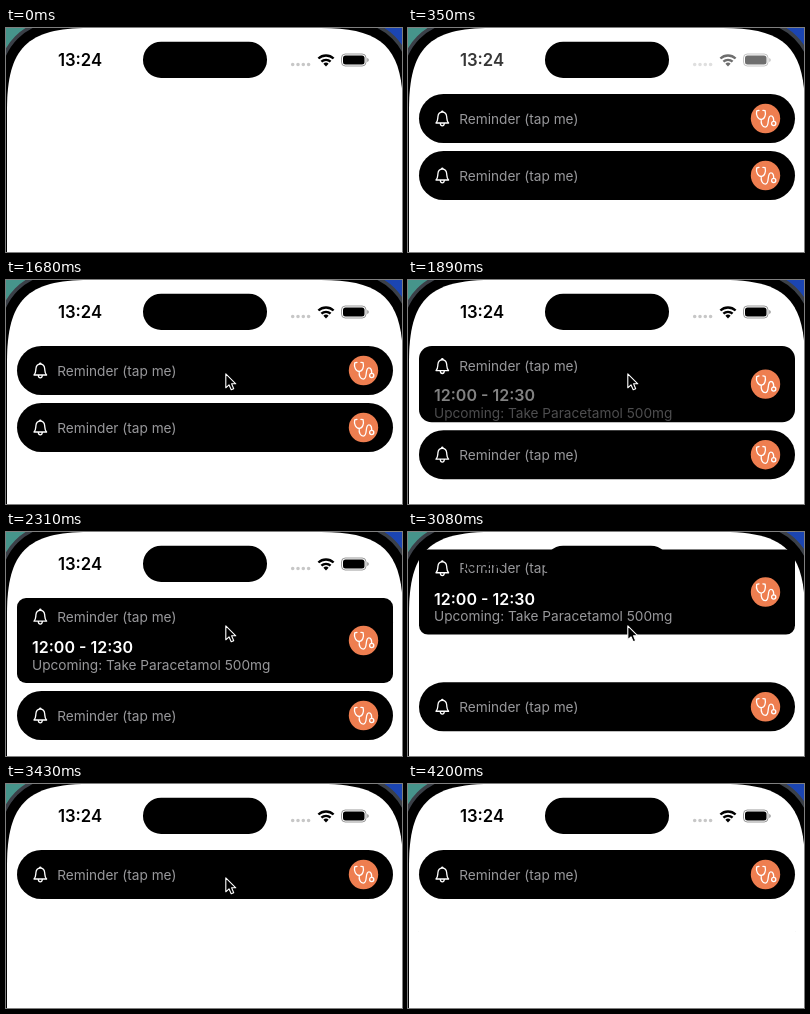
Animation, 396 px wide and 224 px high, one loop 4.34 s. Source, as an HTML page:

```html
<!DOCTYPE html>
<html lang="en">
<head>
<meta charset="utf-8">
<title>Reminder cards</title>
<style>
  html, body { margin: 0; width: 100%; height: 100%; overflow: hidden; background: #000; }
  svg { display: block; width: 100%; height: 100%; font-family: Inter, "Open Sans", sans-serif; }
  .line { fill: none; stroke: #fff; stroke-width: 1.3; stroke-linecap: round; stroke-linejoin: round; }
  .muted { fill: #98989b; font-size: 13.65px; }
  .title { fill: #fff; font-size: 16px; font-weight: 600; }
  .clock { font-size: 16.7px; font-weight: 600; }
</style>
</head>
<body>
<svg viewBox="0 0 396 224">
  <defs>
    <linearGradient id="desktop">
      <stop offset=".1" stop-color="#46948b"/>
      <stop offset=".9" stop-color="#1b45b2"/>
    </linearGradient>
    <path id="screen" d="M1 300V82C1 20 21 0 83 0H315C377 0 397 20 397 82V300Z"/>
    <g id="bell" class="line">
      <path d="M-6.3 4.3C-4.3 2.3-4.6.4-4.4-2C-4.1-5-2.3-6.5 0-6.5S4.1-5 4.4-2C4.6.4 4.3 2.3 6.3 4.3ZM-1-6.7Q0-8.6 1-6.7M-2 4.8Q-1.8 7.2 0 7.2T2 4.8"/>
    </g>
    <g id="badge">
      <circle r="14.7" fill="#ee7e50"/>
      <path class="line" d="M-6.5-8.2L-8.8-7.6C-9.8-3.5-7.6 1-4.2 1S.6-3.8-.4-7.8L-2.6-8.2M-4.2 1C-4.8 5-3.2 8.6-.2 8.6C4.6 8.6 1-2.6 5.4-2.6C8-2.6 8.2.4 8.2 2.8"/>
      <circle class="line" cx="8.2" cy="5" r="2.1"/>
    </g>
  </defs>

  <rect width="396" height="224" fill="url(#desktop)"/>
  <use href="#screen" fill="none" stroke="#3b4048" stroke-width="27"/>
  <use href="#screen" fill="none" stroke="#000" stroke-width="20"/>
  <use href="#screen" fill="#fff"/>
  <g id="cards"></g>

  <rect x="137" y="13.7" width="124" height="36.3" rx="18.1"/>
  <text id="clock" class="clock" x="74" y="38" text-anchor="middle">13:24</text>
  <g id="icons" fill="currentColor">
    <path d="M286.7 36.5h17" fill="none" stroke="currentColor" stroke-width="3.6" stroke-linecap="round" stroke-dasharray="0 5.3" opacity=".22"/>
    <g transform="translate(320 38.5)">
      <path d="M0 0L-2.6-2.8A3.8 3.8 0 0 1 2.6-2.8Z"/>
      <path d="M-4.6-4.8A6.7 6.7 0 0 1 4.6-4.8M-7.6-8A11 11 0 0 1 7.6-8" fill="none" stroke="currentColor" stroke-width="2.4"/>
    </g>
    <rect x="335.5" y="26" width="24.5" height="12" rx="3.8" fill="none" stroke="currentColor" opacity=".4"/>
    <rect x="337" y="27.5" width="21.5" height="9" rx="2.5"/>
    <path d="M361.2 30Q362.8 30.6 362.8 32T361.2 34Z" opacity=".4"/>
  </g>
  <path id="cursor" d="M0 0V14L3.2 11L5.4 16L7.9 14.9L5.8 10H10Z" stroke="#fff" stroke-width="1.1" stroke-linejoin="round"/>
</svg>
<script>
const LOOP = 4340, STEP = 70;
const $ = id => document.getElementById(id);
const mix = (a, b, k) => a + (b - a) * k;
const progress = (t, start, length) => Math.min(1, Math.max(0, (t - start) / length));
const easeOut = (x, power = 3) => 1 - (1 - x) ** power;
const smooth = x => x * x * (3 - 2 * x);

function makeCard() {
  const root = document.createElementNS("http://www.w3.org/2000/svg", "g");
  root.innerHTML = `
    <rect x="11" width="376"/>
    <g><use href="#bell" x="34.3" y="24.7"/><text class="muted" x="51.2" y="29.5">Reminder (tap me)</text></g>
    <g><text class="title" x="26" y="55">12:00 - 12:30</text>
       <text class="muted" x="26" y="71.7">Upcoming: Take Paracetamol 500mg</text></g>
    <use href="#badge" x="357.5"/>`;
  $("cards").append(root);
  const [box, header, details, badge] = root.children;
  return (y, open) => {
    const height = mix(49, 85, open);
    root.setAttribute("transform", `translate(0 ${y})`);
    box.setAttribute("height", height);
    box.setAttribute("rx", mix(24.5, 9, open));
    header.setAttribute("transform", `translate(0 ${mix(0, -5.8, open)})`);
    details.setAttribute("opacity", Math.max(0, 2 * open - 1));
    badge.setAttribute("y", height / 2);
  };
}
const lower = makeCard(), upper = makeCard();

function draw(t) {
  // Both cards drop in, the upper one opens, then it is swiped away and the lower one takes its place.
  const drop = mix(-175, 0, easeOut(progress(t, 0, 350)));
  const open = easeOut(progress(t, 1680, 560));
  const swipe = easeOut(progress(t, 3010, 350), 1.7);
  const rise = smooth(progress(t, 3010, 370));
  upper(66 + drop - 153.5 * swipe, open);
  lower(mix(mix(123, 159, open), 66, rise) + drop, 0);

  // The status bar lightens while cards pass beneath it.
  const glow = Math.sin(Math.PI * progress(t, 70, 420)) / 2;
  const gray = level => `rgb(${Array(3).fill(Math.round(255 * level))})`;
  $("clock").setAttribute("fill", gray(glow / 2));
  $("icons").setAttribute("color", gray(glow));

  const away = 1 - easeOut(progress(t, 770, 560)) + progress(t, 3570, 210);
  $("cursor").setAttribute("transform", `translate(${mix(219.8, 310, away)} ${mix(93.8, 240, away)})`);
}

const start = performance.now();
function tick() {
  const t = (performance.now() - start) % LOOP;
  draw(Math.floor(t / STEP) * STEP);
  requestAnimationFrame(tick);
}
tick();
</script>
</body>
</html>
```
